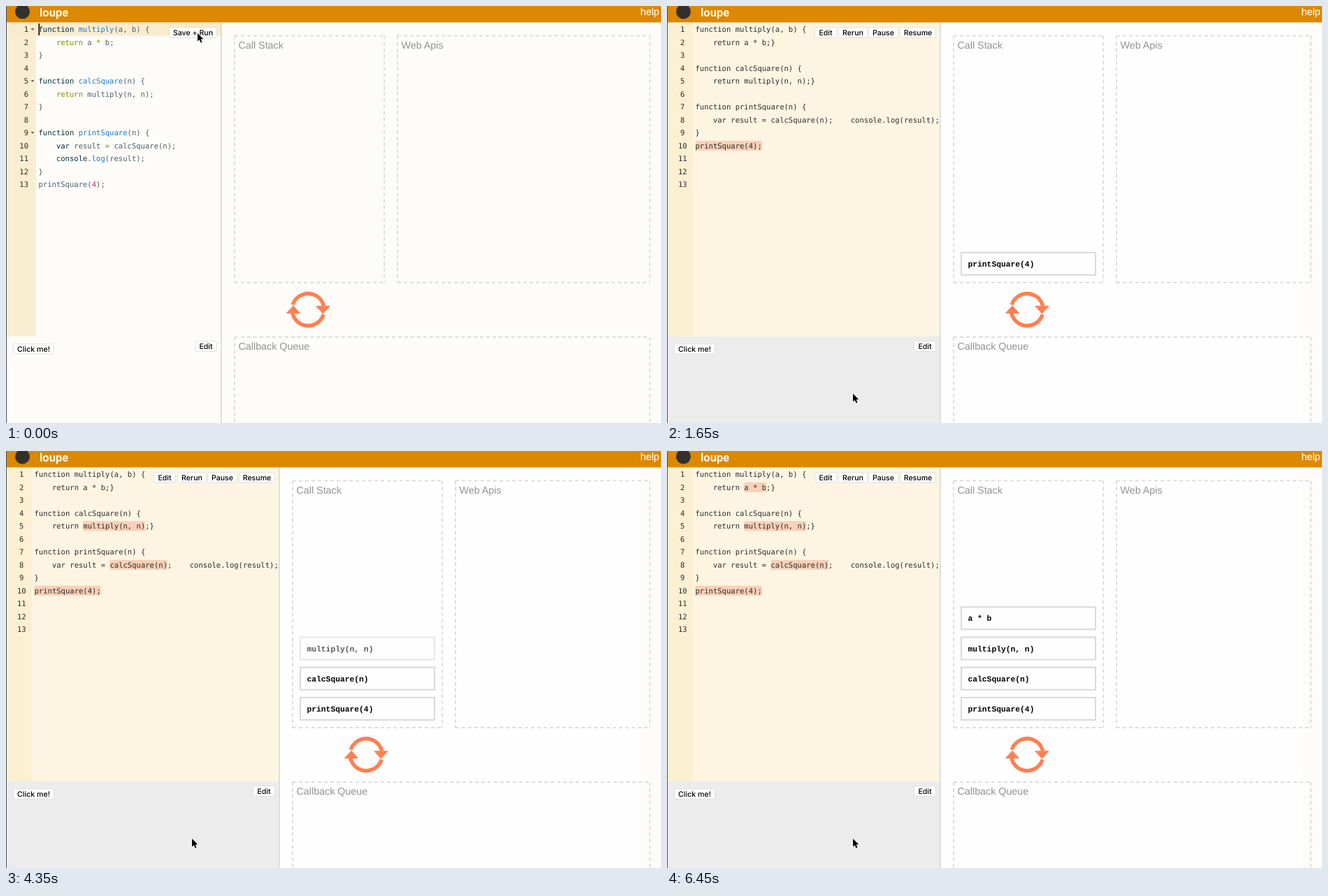
An HTML page that plays this animation: 937 px wide and 597 px high, repeating every 8000 ms.

```html
<!DOCTYPE html>
<html lang="en">
<head>
<meta charset="utf-8">
<title>Call stack visualiser</title>
<style>
  html, body { margin: 0; width: 100%; height: 100%; overflow: hidden; background: #fdfcf8; }
  svg { display: block; width: 937px; height: 597px; }
  text { white-space: pre; text-rendering: geometricPrecision; }

  .code { font: 10.55px "DejaVu Sans Mono", monospace; fill: #2b2b2b; }
  .edit .code { fill: #4c5f66; }
  .edit .code.num { fill: #2b2b2b; }
  .dark { fill: #06303c; }
  .key { fill: #7d9000; }
  .name { fill: #1b7ccb; }
  .lit { fill: #d02a7c; }
  .label { font: 14.3px "Liberation Sans", Arial, sans-serif; fill: #929292; }
  .btn text { font: 500 10.6px Inter, sans-serif; fill: #000; text-anchor: middle; }
  .btn rect { fill: #fff; stroke: #dcd9d3; stroke-width: .8; }
  .dash { fill: none; stroke: #ddd; stroke-width: 2; stroke-dasharray: 5 4; }
  .item rect { fill: #fefefe; stroke: #d9d9d9; stroke-width: 2; }
  .item text { font: bold 11.3px "Liberation Mono", "Courier New", monospace; fill: #000; }
  .mark { fill: #f8d0b8; }

  .anim { animation: 8s step-end infinite; }
  .edit { animation-name: edit; }
  .run { animation-name: run; }
  .s1 { animation-name: s1; }
  .s2 { animation-name: s2; }
  .s3 { animation-name: s3; }
  .s4 { animation-name: s4; }
  .m3 { animation-name: m3; }
  .m4 { animation-name: m4; }
  .cursor { animation-name: cursor; }

  @keyframes edit { 0% { opacity: 1 } 3.75%, 100% { opacity: 0 } }
  @keyframes run { 0% { opacity: 0 } 3.75%, 100% { opacity: 1 } }
  @keyframes s1 { 0% { opacity: 0 } 5.625%, 100% { opacity: 1 } }
  @keyframes s2 { 0% { opacity: 0 } 30%, 100% { opacity: 1 } }
  @keyframes s3 { 0% { opacity: 0 } 54.375% { opacity: .65 } 56.25%, 100% { opacity: 1 } }
  @keyframes s4 { 0% { opacity: 0 } 78.75% { opacity: .18 } 80.625%, 100% { opacity: 1 } }
  @keyframes m3 { 0% { opacity: 0 } 54.375%, 100% { opacity: 1 } }
  @keyframes m4 { 0% { opacity: 0 } 78.75%, 100% { opacity: 1 } }
  @keyframes cursor {
    0% { transform: translate(274px, 39px) }
    11.25% { transform: translate(277.5px, 125px) }
    13.125% { transform: translate(266.5px, 329px) }
    15% { transform: translate(264.5px, 414.5px) }
    18.75% { transform: translate(264.5px, 525.5px) }
    20.625%, 100% { transform: translate(266px, 555px) }
  }
</style>
</head>
<body>
<svg id="stage" viewBox="0 0 937 597"></svg>
<script>
const PITCH = 18.5, CHAR = 6.35;
const base = line => 37 + PITCH * (line - 1);

const rect = (x, y, w, h, fill) =>
  `<rect x="${x}" y="${y}" width="${w}" height="${h}" fill="${fill}"/>`;
const text = (x, y, s, cls, extra = '') =>
  `<text x="${x}" y="${y}" class="${cls}" ${extra}>${s}</text>`;
const button = (x1, x2, y, s) => `<g class="btn">
  <rect x="${x1 + .5}" y="${y + .8}" width="${x2 - x1 - 1}" height="14.4" rx="2.5"/>
  <text x="${(x1 + x2) / 2}" y="${y + 11.7}">${s}</text></g>`;
const edges = (x1, y1, x2, y2) =>
  `<path class="dash" d="M${x1} ${y1}H${x2}M${x1} ${y2}H${x2}M${x1} ${y1}V${y2}M${x2} ${y1}V${y2}"/>`;

const editLines = [
  'function multiply(a, b) {', '    return a * b;', '}', '',
  'function calcSquare(n) {', '    return multiply(n, n);', '}', '',
  'function printSquare(n) {', '    var result = calcSquare(n);',
  '    console.log(result);', '}', 'printSquare(4);'
];
const runLines = [
  'function multiply(a, b) {', '    return a * b;}', '',
  'function calcSquare(n) {', '    return multiply(n, n);}', '',
  'function printSquare(n) {',
  '    var result = calcSquare(n);    console.log(result);',
  '}', 'printSquare(4);'
];

const tokens = /(function|var|console)|(return|[*=])|((?<=function )\w+|log)|(\d)/g;
const classes = ['dark', 'key', 'name', 'lit'];
const colour = s => s.replace(tokens, (m, ...groups) =>
  `<tspan class="${classes[groups.findIndex(g => g)]}">${m}</tspan>`);

const listing = (lines, x, paint) =>
  lines.map((s, i) => text(x, base(i + 1), paint(s), 'code')).join('');
const numbers = (x, anchor) => editLines.map((_, i) =>
  text(x, base(i + 1), i + 1, 'code num', `text-anchor="${anchor}"`)).join('');

const fold = line => `<path d="M35.5 ${base(line) - 5}h5l-2.5 3z" fill="#666"/>`;
const mark = (line, col, len, cls) =>
  `<rect class="mark anim ${cls}" x="${40.5 + col * CHAR}" y="${base(line) - 10.5}" width="${len * CHAR}" height="14"/>`;
const item = (n, s) => {
  const y = 353 - 43.2 * (n - 1);
  return `<g class="item anim s${n}"><rect x="421" y="${y}" width="192" height="32"/>
    <text x="430.5" y="${y + 20}">${s}</text></g>`;
};

const half = '<path d="M-22-6.9A23 23 0 0 1 22.4-5" fill="none" stroke="#ff7f50" stroke-width="5.4"/>' +
  '<path d="M10.7-5.5H31.7L21.2 6z" fill="#ff7f50"/>';
const refresh = x => `<g transform="translate(${x} 434.7)">${half}<g transform="rotate(180)">${half}</g></g>`;

// Right-hand side; x is the left edge of the call stack
const panels = x =>
  rect(x - 20, 24, 1.8, 573, '#dbdbd9') +
  edges(x, 42.5, x + 214, 396) + edges(x + 233, 42.5, 921, 396) + edges(x, 474, 921, 620) +
  text(x + 5.5, 61, 'Call Stack', 'label') +
  text(x + 238.5, 61, 'Web Apis', 'label') +
  text(x + 5.5, 492, 'Callback Queue', 'label') +
  refresh(x + 105.2);

const editView = `<g class="edit anim">
  ${rect(1, 24, 42, 449, '#f9eed2')}
  ${rect(1, 24, 306, 18.5, '#f8ebce')}
  ${numbers(32, 'end')}${[1, 5, 9].map(fold).join('')}
  ${listing(editLines, 46.5, colour)}
  ${rect(46.5, 25, 1.6, 17, '#000')}
  ${panels(327)}
  ${button(233, 302, 30, 'Save + Run')}${button(270, 302, 479, 'Edit')}
</g>`;

const runView = `<g class="run anim">
  ${rect(1, 24, 908, 573, '#fefefe')}
  ${rect(1, 24, 389, 449, '#fdf5e2')}
  ${rect(1, 24, 36, 449, '#fcf0d2')}
  ${rect(1, 473, 389, 124, '#ececec')}
  ${mark(10, 0, 15, '')}${mark(8, 17, 13, 's2')}${mark(5, 11, 14, 'm3')}${mark(2, 11, 5, 'm4')}
  ${numbers(22.3, 'middle')}
  ${listing(runLines, 40.5, s => s)}
  ${panels(410)}
  ${button(211, 243, 30, 'Edit')}${button(245, 287, 30, 'Rerun')}
  ${button(288, 331, 30, 'Pause')}${button(333, 385, 30, 'Resume')}
  ${button(353, 385, 479, 'Edit')}
  ${['printSquare(4)', 'calcSquare(n)', 'multiply(n, n)', 'a * b'].map((s, i) => item(i + 1, s)).join('')}
</g>`;

document.getElementById('stage').innerHTML =
  rect(0, 0, 937, 597, '#fdfcf8') + editView + runView +
  button(10, 69, 483, 'Click me!') +
  rect(0, 0, 937, 23.5, '#dc8800') +
  '<circle cx="23.5" cy="8" r="10.5" fill="#33302c"/>' +
  text(48, 15, 'loupe', '', 'style="font:bold 16.5px Roboto,sans-serif" fill="#fdf6e3"') +
  text(907.5, 13, 'help', '', 'style="font:14.3px \'Liberation Sans\',Arial,sans-serif" fill="#fff8ea" stroke="#fff8ea" stroke-width=".25"') +
  rect(0, 0, 1, 597, '#4a5058') +
  `<path class="cursor anim" d="M0 0V11.6L2.7 9.2L4.6 13.6L6.5 12.8L4.7 8.5L8.3 8.2Z"
    fill="#000" stroke="#fff" stroke-width="1.6" paint-order="stroke" stroke-linejoin="round"/>`;
</script>
</body>
</html>
```
